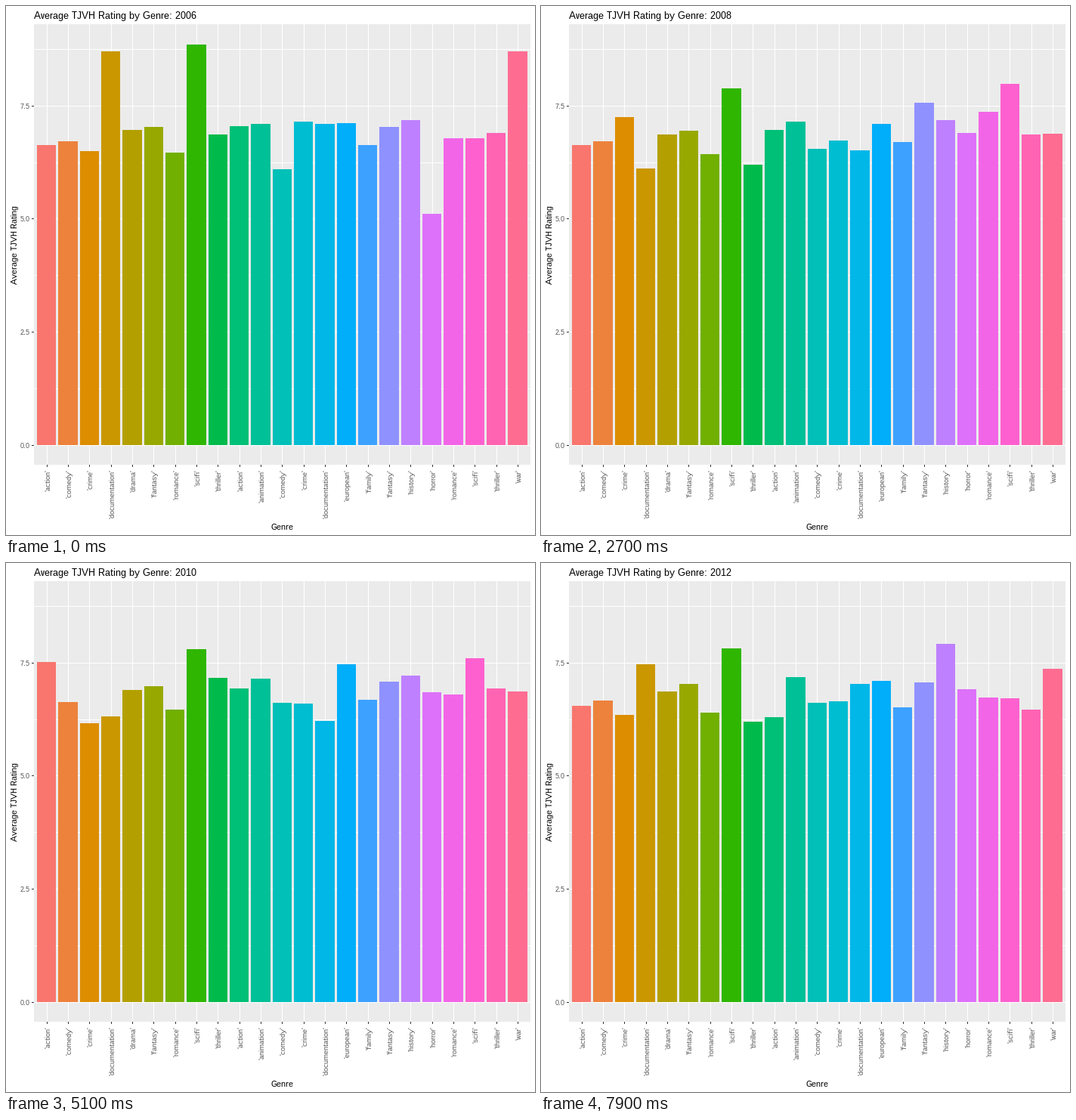
These frames come from a looping animation (700x700 px, 8000 ms). A matplotlib script:

```python
import numpy as np
import matplotlib.pyplot as plt
from matplotlib.animation import FuncAnimation
from matplotlib.patches import Rectangle

plt.rcParams.update({
    "font.family": "Liberation Sans",
    "text.hinting": "native",
    "text.hinting_factor": 1,
})

SIZE = 700
LEFT, TOP, RIGHT, BOTTOM = 37, 24, 694, 607
ZERO, UNIT = 581.2, 59.85          # y of rating 0, pixels per rating point
FIRST, STEP, WIDTH = 41.1, 28.32, 25.38
YEARS = range(2006, 2014)
CYCLE, HOLD, MOVE = 12, 2, 9       # frames per year, lead-in, transition

# Usual rating of each genre and the years (after 2000) that stand out
GENRES = [
    ("action", 6.57, {7: 5.46, 9: 7.19, 10: 7.54}),
    ("comedy", 6.66, {}),
    ("crime", 7.31, {6: 6.51, 10: 6.17, 13: 5.83}),
    ("documentation", 7.46, {6: 8.71, 8: 6.12, 10: 6.32}),
    ("drama", 6.91, {}),
    ("fantasy", 7.01, {9: 7.51}),
    ("romance", 6.41, {}),
    ("scifi", 7.82, {6: 8.86, 11: 5.92}),
    ("thriller", 6.27, {6: 6.88, 7: 7.03, 10: 7.19, 11: 5.77}),
    ("action", 7.01, {12: 6.47, 13: 6.22}),
    ("animation", 7.18, {}),
    ("comedy", 6.62, {6: 6.11}),
    ("crime", 6.67, {6: 7.16}),
    ("documentation", 7.07, {7: 7.72, 8: 6.52, 9: 7.78, 10: 6.22}),
    ("european", 7.06, {10: 7.48}),
    ("family", 6.66, {7: 7.22, 12: 6.22}),
    ("fantasy", 7.04, {7: 6.27, 8: 7.58}),
    ("history", 7.26, {12: 7.93, 13: 7.93}),
    ("horror", 6.88, {6: 5.12, 9: 7.71}),
    ("romance", 6.74, {8: 7.39, 9: 6.32}),
    ("scifi", 6.74, {7: 5.91, 8: 8.01, 9: 6.19, 10: 7.61}),
    ("thriller", 6.86, {9: 6.07, 13: 6.29}),
    ("war", 6.81, {6: 8.71, 7: 6.27, 12: 7.38, 13: 7.38}),
]

rng = np.random.default_rng(4)
ratings = np.array([
    [peaks.get(year - 2000, usual + rng.uniform(-0.08, 0.08)) for year in YEARS]
    for _, usual, peaks in GENRES
])


def hcl(hue, chroma=100, light=65):
    """Polar LUV colour to sRGB."""
    h = np.radians(hue)
    u = chroma * np.cos(h) / (13 * light) + 0.19784
    v = chroma * np.sin(h) / (13 * light) + 0.46834
    y = ((light + 16) / 116) ** 3
    x = 9 * y * u / (4 * v)
    z = -x / 3 - 5 * y + 3 * y / v
    lin = np.array([
        3.240479 * x - 1.537150 * y - 0.498535 * z,
        -0.969256 * x + 1.875992 * y + 0.041556 * z,
        0.055648 * x - 0.204043 * y + 1.057311 * z,
    ])
    lin = np.clip(lin, 0, 1)
    return np.where(lin > 0.00304, 1.055 * lin ** (1 / 2.4) - 0.055, 12.92 * lin)


def ease(t):
    return 4 * t ** 3 if t < 0.5 else 1 - 4 * (1 - t) ** 3


fig = plt.figure(figsize=(SIZE / 72, SIZE / 72), dpi=72, facecolor="white")
ax = fig.add_axes([0, 0, 1, 1])
ax.set_xlim(0, SIZE)
ax.set_ylim(SIZE, 0)
ax.axis("off")


def box(x0, y0, x1, y1, color):
    rect = Rectangle((x0, y0), x1 - x0, y1 - y0, facecolor=color,
                     linewidth=0, antialiased=False)
    ax.add_patch(rect)
    return rect


def label(x, y, text, size, color="black", **kw):
    return ax.text(x, y, text, fontsize=size, color=color,
                   rotation_mode="anchor", va="baseline", **kw)


box(LEFT, TOP, RIGHT, BOTTOM, "#EBEBEB")

for i in range(8):
    value = 1.25 * i
    y = int(ZERO - UNIT * value)
    box(LEFT, y, RIGHT, y + 1, "white")
    if i % 2 == 0:
        box(LEFT - 3, y, LEFT, y + 1, "#333333")
        label(32, y + 4, f"{value:.1f}", 9, "#4D4D4D", ha="right")

bars = []
for i, (name, *_) in enumerate(GENRES):
    x = FIRST + STEP * i
    mid = int(x + 13.2)
    box(mid, TOP, mid + 1, BOTTOM, "white")
    box(mid, BOTTOM, mid + 1, BOTTOM + 3, "#333333")
    label(mid + 4, 613, f"'{name}'", 9, "#4D4D4D", ha="right", rotation=90)
    bars.append(box(round(x), TOP, round(x + WIDTH), int(ZERO),
                    hcl(15 + 360 * i / len(GENRES))))

label(365, 693, "Genre", 11, ha="center")
label(15.5, 316.5, "Average TJVH Rating", 11, ha="center", rotation=90)
title = label(37, 17, "", 13, ha="left")


def update(frame):
    year, k = divmod(max(frame - HOLD, 0), CYCLE)
    k = min(k, MOVE)
    p = ease(k / MOVE)
    now = (1 - p) * ratings[:, year] + p * ratings[:, year + 1]
    for bar, rating in zip(bars, now):
        y = round(ZERO - UNIT * rating + 0.3)
        bar.set_y(y)
        bar.set_height(int(ZERO) - y)
    shown = YEARS[year + (k > MOVE // 2 + 1)]
    title.set_text(f"Average TJVH Rating by Genre: {shown}")
    return bars + [title]


anim = FuncAnimation(fig, update, frames=80, interval=100,
                     repeat=True, repeat_delay=0, blit=False)
plt.show()
```
